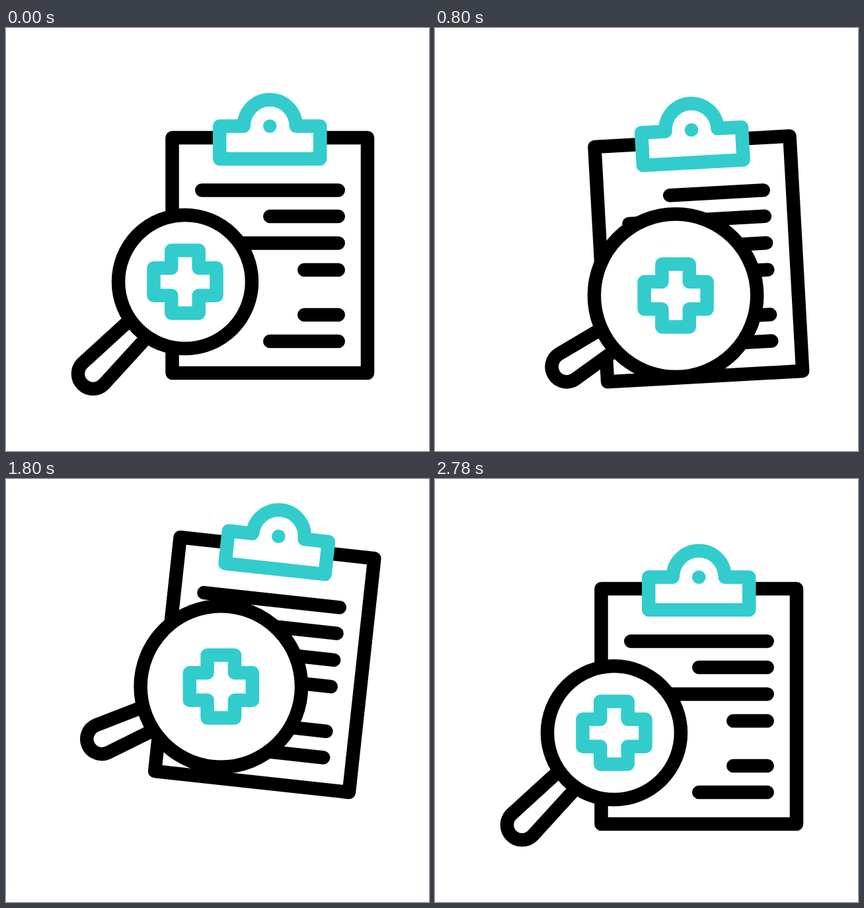
An HTML page that plays this animation: 640x640 px, repeating every 2.8 s.

```html
<!DOCTYPE html>
<html lang="en">
<head>
<meta charset="utf-8">
<title>Medical report check</title>
<style>
  html, body { margin: 0; width: 100%; height: 100%; overflow: hidden; background: #fff; }
  svg { display: block; width: 100%; height: 100%; }
  .ink, .teal { fill: #fff; stroke: #000; stroke-width: 20.5; stroke-linejoin: round; stroke-linecap: round; }
  .teal { stroke: #33cccc; }
</style>
</head>
<body>
<svg viewBox="0 0 640 640">
  <g id="board">
    <rect class="ink" x="-147.75" y="-178" width="295.5" height="356"/>
    <g id="lines"></g>
    <path class="teal" d="M-76-195.5H-39.5A39.5 40 0 0 1 39.5-195.5H76V-146H-76Z"/>
    <circle cy="-195.5" r="10.3" fill="#33cccc"/>
  </g>
  <g id="lens">
    <path id="handle" class="ink" d="M-100-18.3L-197-22.7A22.7 22.7 0 0 0-197 22.7L-100 18.3Z"/>
    <circle id="ring" class="ink"/>
    <path class="teal" d="M-20.7-47.5H20.7V-20.7H47.5V20.7H20.7V47.5H-20.7V20.7H-47.5V-20.7H-20.7Z"/>
  </g>
</svg>
<script>
const LOOP = 2800, LINE_END = 103.5, STRETCH = 560;
const $ = id => document.getElementById(id);

// Each line slides its left end by `swing`, then back to `rest`
const lines = [
  { y: -98.5, rest: -103, swing: 98, out: 460, back: 1170 },
  { y: -59, rest: 0, swing: -103, out: 260, back: 780 },
  { y: -18.5, rest: -103, swing: 103, out: 640, back: 1240 },
  { y: 22, rest: 52, swing: -102, out: 400, back: 2000 },
  { y: 90, rest: 52, swing: -155, out: 280, back: 1300 },
  { y: 130, rest: 0, swing: -103, out: 380, back: 1400 }
];
for (const line of lines) {
  line.el = document.createElementNS("http://www.w3.org/2000/svg", "path");
  line.el.setAttribute("class", "ink");
  $("lines").append(line.el);
}

function draw(t) {
  // Eased step from 0 to 1 between two times
  const move = (from, to) => {
    const s = Math.min(1, Math.max(0, (t - from) / (to - from)));
    return s * s * (3 - 2 * s);
  };
  const thereAndBack = (a, b, c, d) => move(a, b) - move(c, d);

  const boardX = 399.25 + 3 * move(0, 450) - 13 * move(600, 1200)
    + 2 * move(1250, 1550) + 8 * move(2250, 2710);
  const boardY = 344 + 13 * move(0, 400) - 65 * move(705, 1157) - 20 * move(1200, 1760)
    + 86 * move(1700, 2200) - 14 * move(2300, 2710);
  const tilt = -22 * move(260, 780) + 26 * move(640, 886) + 2.5 * move(1300, 1750)
    - 14 * move(1750, 2330) + 7.5 * move(2330, 2710);
  $("board").setAttribute("transform", `translate(${boardX} ${boardY}) rotate(${tilt})`);

  for (const { el, y, rest, swing, out, back } of lines) {
    const x = rest + swing * thereAndBack(out, out + STRETCH, back, back + STRETCH);
    el.setAttribute("d", `M${x} ${y}H${LINE_END}`);
  }

  const lensX = 271 + 115 * thereAndBack(120, 1065, 1145, 2410);
  const lensY = 384 + 28 * move(0, 560) - 98 * move(620, 1700)
    + 78 * move(1840, 2540) - 8 * move(2540, LOOP);
  const angle = 45 - 26.2 * thereAndBack(0, 1720, 1520, 2530);
  const radius = 101 + 25 * thereAndBack(54, 998, 1580, 2420);
  $("lens").setAttribute("transform", `translate(${lensX} ${lensY})`);
  $("handle").setAttribute("transform", `rotate(${-angle})`);
  $("ring").setAttribute("r", radius);
}

const start = performance.now();
function tick() {
  draw((performance.now() - start) % LOOP);
  requestAnimationFrame(tick);
}
draw(0);
requestAnimationFrame(tick);
</script>
</body>
</html>
```
